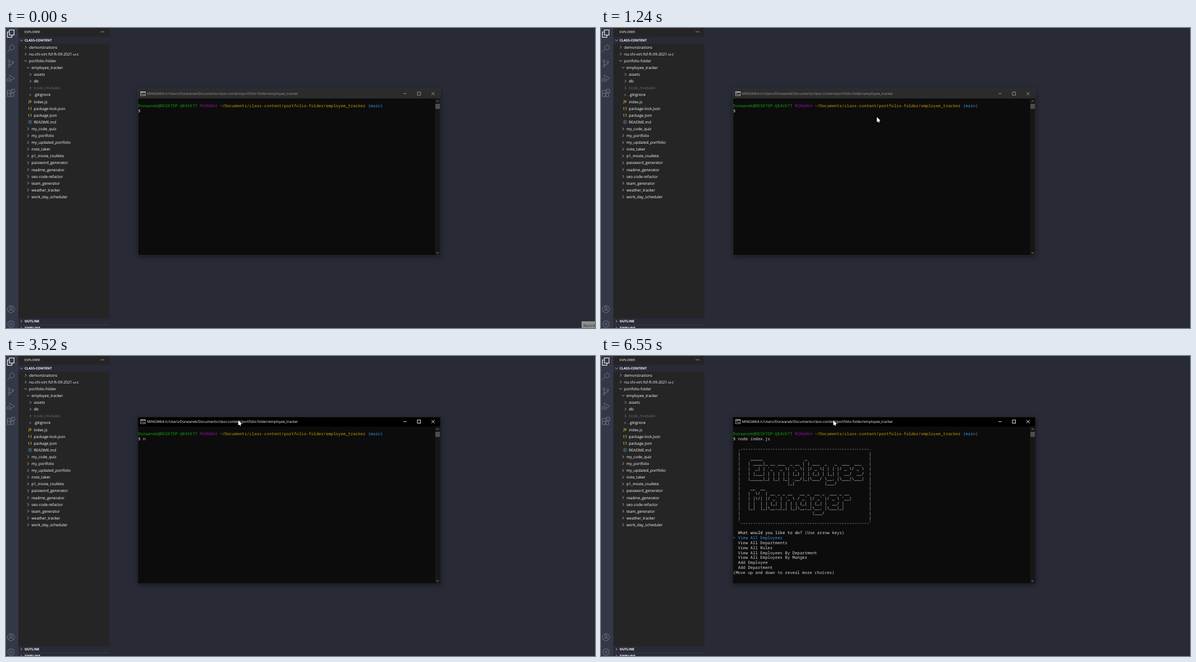
An HTML page with a canvas that plays this animation: 1048x534 px, repeating every 8 s.

```html
<!DOCTYPE html>
<html lang="en">
<head>
<meta charset="utf-8">
<title>Employee manager demo</title>
<style>
html, body { margin: 0; width: 100%; height: 100%; overflow: hidden; background: #282a36; }
canvas { display: block; }
</style>
</head>
<body>
<canvas id="stage" width="1048" height="534"></canvas>
<script>
const ctx = document.getElementById('stage').getContext('2d');
const LOOP = 8000, TAU = Math.PI * 2;
const UI = '"Open Sans", "Noto Sans", sans-serif';
const MONO = '"Noto Sans Mono", "DejaVu Sans Mono", monospace';
const USER = 'Dorwanek', HOST = 'DESKTOP-QK4VX7T';
const CELL = 4.4, LINE = 8.8, ROW = 12.1;
const ICON = '#6d7387', LIGHT = '#c5c5c5', WHITE = '#ffffff';

function rect(x, y, w, h, color) {
  ctx.fillStyle = color;
  ctx.fillRect(x, y, w, h);
}

function box(x, y, w, h, color, width = 1) {
  ctx.strokeStyle = color;
  ctx.lineWidth = width;
  ctx.strokeRect(x, y, w, h);
}

function text(str, x, y, color, size, weight = 500, family = UI) {
  ctx.font = `${weight} ${size}px ${family}`;
  ctx.fillStyle = color;
  ctx.fillText(str, x, y);
}

function path(color, width, ...points) {
  ctx.strokeStyle = color;
  ctx.lineWidth = width;
  ctx.beginPath();
  for (const [x, y] of points) ctx.lineTo(x, y);
  ctx.stroke();
}

function ring(x, y, r, color, width = 1, from = 0, to = TAU) {
  ctx.strokeStyle = color;
  ctx.lineWidth = width;
  ctx.beginPath();
  ctx.arc(x, y, r, from, to);
  ctx.stroke();
}

// An angle mark pointing right, turned by a number of quarter turns.
function chevron(x, y, quarter = 0, color = LIGHT, s = 2.3) {
  ctx.save();
  ctx.translate(x, y);
  ctx.rotate(quarter * TAU / 4);
  path(color, 0.9, [-s / 2, -s], [s / 2, 0], [-s / 2, s]);
  ctx.restore();
}

// Activity bar

function filesIcon(x, y) {
  box(x - 6, y - 3, 8, 9.5, WHITE, 1.1);
  rect(x - 3, y - 7, 9, 10, '#343746');
  box(x - 2.5, y - 6.5, 8.3, 9, WHITE, 1.1);
}

function searchIcon(x, y) {
  ring(x + 2, y - 2, 4.2, ICON);
  path(ICON, 1.1, [x - 1, y + 1], [x - 6, y + 6.5]);
}

function branchIcon(x, y) {
  for (const [dx, dy] of [[-3, -4.5], [-3, 4.7], [3.5, -2]]) ring(x + dx, y + dy, 1.9, ICON);
  path(ICON, 1, [x - 3, y - 2.6], [x - 3, y + 2.8]);
  path(ICON, 1, [x + 3.5, y], [x + 2, y + 2], [x - 3, y + 2]);
}

function debugIcon(x, y) {
  path(ICON, 1, [x - 2.5, y - 2], [x - 2.5, y - 6], [x + 6.5, y], [x + 1, y + 3.8]);
  ring(x - 3, y + 3, 2.7, ICON);
  for (let i = 0; i < 6; i++) {
    const a = (i % 3 - 1) * 0.7 + (i < 3 ? 0 : Math.PI);
    const c = Math.cos(a), s = Math.sin(a);
    path(ICON, 0.8, [x - 3 + 2.7 * c, y + 3 + 2.7 * s], [x - 3 + 4.8 * c, y + 3 + 4.8 * s]);
  }
}

function extensionsIcon(x, y) {
  for (let i = 0; i < 4; i++) {
    const lift = i === 1 ? 1.8 : 0;
    box(x - 6 + (i % 2) * 5.5 + lift, y - 5 + (i >> 1) * 5.5 - lift, 5.5, 5.5, ICON);
  }
}

function accountIcon(x, y) {
  ring(x, y, 6.3, ICON);
  ring(x, y - 2, 2.4, ICON);
  ring(x, y + 5, 4.2, ICON, 1, Math.PI * 1.08, Math.PI * 1.92);
}

function gearIcon(x, y) {
  const teeth = Array.from({ length: 33 }, (_, i) => {
    const a = (i + 0.5) * TAU / 32, r = i % 4 < 2 ? 6.4 : 4.8;
    return [x + r * Math.cos(a), y + r * Math.sin(a)];
  });
  path(ICON, 1, ...teeth);
  ring(x, y, 1.9, ICON);
}

function activityBar() {
  rect(0, 0, 22, 534, '#343746');
  [filesIcon, searchIcon, branchIcon, debugIcon, extensionsIcon]
    .forEach((icon, i) => icon(8.5, 10 + i * 26.5));
  accountIcon(8.8, 500.5);
  gearIcon(8.8, 527);
}

// Explorer: each line is indented by depth and starts with its kind of icon

const TREE = `
> demonstrations
> nu-chi-virt-fsf-ft-09-2021-u-c
v portfolio-folder
 v employee_tracker
  > assets
  > db
  > node_modules
  # .gitignore
  JS index.js
  {} package-lock.json
  {} package.json
  i README.md
 > my_code_quiz
 > my_portfolio
 > my_updated_portfolio
 > note_taker
 > p1_movie_roullete
 > password_generator
 > readme_generator
 > seo-code-refactor
 > team_generator
 > weather_tracker
 > work_day_scheduler`.slice(1).split('\n').map(s => {
  const [kind, label] = s.trim().split(' ');
  return { kind, label, depth: s.search(/\S/) };
});

function treeIcon(kind, x, y, color) {
  if (kind === '>') chevron(x, y, 0, color);
  else if (kind === 'v') chevron(x, y, 1, color);
  else if (kind === '#') rect(x - 2.5, y - 1.7, 3.4, 3.4, '#41535b');
  else if (kind === 'i') {
    ring(x - 0.8, y, 2.8, '#519aba', 0.8);
    path('#519aba', 0.9, [x - 0.8, y - 1.7], [x - 0.8, y + 1.7]);
  } else if (kind === 'JS') text(kind, x - 3.6, y + 2.1, '#e0b43c', 6, 700);
  else text('{ }', x - 4, y + 2.1, '#d8c840', 6, 700);
}

function section(y, label, quarter) {
  chevron(27.5, y, quarter);
  text(label, 33, y + 2.2, WHITE, 6, 700);
}

function explorer() {
  rect(22, 0, 162, 534, '#252526');
  rect(22, 15.5, 162, 12.5, '#282a36');
  rect(22, 516.5, 162, 17.5, '#282a36');
  rect(22, 528, 162, 0.6, '#454753');

  text('EXPLORER', 33, 8.6, WHITE, 5.7);
  for (let i = 0; i < 3; i++) rect(168.6 + i * 2.4, 6.2, 1.2, 1.2, '#d0d0d0');
  section(22, 'CLASS-CONTENT', 1);

  TREE.forEach(({ kind, label, depth }, i) => {
    const x = 41 + depth * 4.3, y = 34.3 + i * ROW;
    const dim = label === 'node_modules';
    treeIcon(kind, x - 6, y, dim ? '#8a8a8a' : LIGHT);
    text(label, x, y + 2.4, dim ? '#6c6c6c' : WHITE, 6.8);
  });

  section(522, 'OUTLINE', 0);
  section(534.2, 'TIMELINE', 0);
}

// Terminal

const BANNER = String.raw`
 _____                 _
| ____|_ __ ___  _ __ | | ___  _   _  ___  ___
|  _| | '_ ' _ \| '_ \| |/ _ \| | | |/ _ \/ _ \
| |___| | | | | | |_) | | (_) | |_| |  __/  __/
|_____|_| |_| |_| .__/|_|\___/ \__, |\___|\___|
                |_|            |___/
 __  __
|  \/  | __ _ _ __   __ _  __ _  ___ _ __
| |\/| |/ _' | '_ \ / _' |/ _' |/ _ \ '__|
| |  | | (_| | | | | (_| | (_| |  __/ |
|_|  |_|\__,_|_| |_|\__,_|\__, |\___|_|
                          |___/
`.replace(/(_) '(?= _ \\\|)|(_)'(?= \|)|(_)'(?= \|\/)/g, m => m.replace("'", '`')).split('\n');
const CHOICES = ['View All Employees', 'View All Departments', 'View All Roles',
  'View All Employees By Department', 'View All Employees By Manger',
  'Add Employee', 'Add Department'];
const CLICK = 2370, OUTPUT = 6550;

function put(str, col, row, color = '#d4d4d4', weight = 400) {
  text(str, 235 + col * CELL, 141.4 + row * LINE, color, CELL / 0.6, weight, MONO);
}

// Keys pressed by time t when a word is typed evenly between two times.
function keys(word, from, to, t) {
  if (t < from) return '';
  return word.slice(0, 1 + Math.floor((t - from) / (to - from) * (word.length - 1) + 1e-6));
}

function command(t) {
  const tail = t < 4890 ? '' : ' ' + keys('ind', 4890, 5220, t);
  return keys('node', 3520, 4090, t) + tail + (t < 5400 ? '' : 'ex.js');
}

function prompt(t) {
  const parts = [
    [`${USER}@${HOST}`, '#13a10e'],
    ['MINGW64', '#881798'],
    ['~/Documents/class-content/portfolio-folder/employee_tracker', '#c19c00'],
    ['(main)', '#3a96dd']
  ];
  let col = 0;
  for (const [str, color] of parts) {
    put(str, col, 0, color);
    col += str.length + 1;
  }
  put('$ ' + command(t), 0, 1);
}

function output() {
  const rule = '-'.repeat(52);
  const frame = [`,${rule}.`, ...BANNER.map(s => '|   ' + s.padEnd(49) + '|'), '`' + rule + "'"];
  frame.forEach((s, i) => put(s, 2, 3 + i, '#d4d4d4', 500));

  put('What would you like to do?', 2, 20, '#f2f2f2', 500);
  put('(Use arrow keys)', 29, 20);
  put('>', 0, 21, '#3a96dd');
  CHOICES.forEach((s, i) => put(s, 2, 21 + i, i ? '#d4d4d4' : '#3a96dd'));
  put('(Move up and down to reveal more choices)', 0, 28);
}

function titleBar(active) {
  const ink = active ? WHITE : '#9a9a9a';
  rect(235, 109, 538, 16.5, active ? '#000000' : '#2b2b2b');

  box(239.5, 113.5, 8.5, 7, '#b8b8b8', 0.8);
  rect(239.5, 113.2, 8.5, 1.5, '#d8d8d8');
  rect(241, 117, 2.5, 1, '#e8e8e8');
  rect(244.5, 118, 2, 1, '#e8e8e8');

  text(`MINGW64:/c/Users/${USER}/Documents/class-content/portfolio-folder/employee_tracker`,
    251, 119.2, ink, 6.35);

  const y = 116.8, s = 2.8;
  path(ink, 0.9, [710 - s, y], [710 + s, y]);
  box(734.8 - s, y - s, 2 * s, 2 * s, ink, 0.9);
  for (const k of [-s, s]) path(ink, 0.9, [760 - s, y - k], [760 + s, y + k]);
}

function terminal(t) {
  const active = t >= CLICK;
  ctx.save();
  ctx.shadowColor = 'rgba(0,0,0,.45)';
  ctx.shadowBlur = 9;
  ctx.shadowOffsetY = 2;
  rect(235, 109, 538, 296, '#0c0c0c');
  ctx.restore();

  titleBar(active);
  rect(763.5, 125.5, 9, 279, '#171717');
  rect(764, 135, 8, 9, '#4d4d4d');
  chevron(768, 130.3, 3, '#b0b0b0', 2);
  chevron(768, 400.3, 1, '#b0b0b0', 2);
  box(234.8, 108.8, 538, 296, active ? '#24252b' : '#3b3c42', 0.6);

  ctx.save();
  ctx.beginPath();
  ctx.rect(235, 125.5, 528, 279);
  ctx.clip();
  prompt(t);
  if (t >= OUTPUT) output();
  ctx.restore();
}

// Pointer

const START = [1046, 531], REST = [568.3, 202.5], TITLE = [413.3, 114.5];
const ease = p => p * p * (3 - 2 * p);

// Moves in even time steps; the first step falls on the begin time.
function glide(a, b, t, begin, end, steps) {
  const n = Math.floor((t - begin) / (end - begin) * (steps - 1) + 1e-6);
  const p = ease(Math.min(1, (n + 1) / steps));
  return a.map((v, i) => v + (b[i] - v) * p);
}

function pointerAt(t) {
  return t < 860 ? glide(START, REST, t, 50, 760, 14) : glide(REST, TITLE, t, 860, 1640, 16);
}

function pointer(t) {
  if (t >= CLICK && t < CLICK + 90) {
    ctx.fillStyle = 'rgba(200,165,10,.87)';
    ctx.beginPath();
    ctx.arc(413, 114.8, 6.8, 0, TAU);
    ctx.fill();
  }
  ctx.save();
  ctx.translate(...pointerAt(t));
  path(WHITE, 1.5, [2, 5], [4.2, 9.6]);
  ctx.beginPath();
  ctx.lineTo(0, 0);
  ctx.lineTo(0, 8.8);
  ctx.lineTo(6.3, 6.3);
  ctx.closePath();
  ctx.fillStyle = WHITE;
  ctx.fill();
  ctx.restore();
}

function recordButton() {
  rect(1024, 522, 24, 12, '#8e8e8e');
  text('Record', 1027.5, 532.3, '#262626', 6.4);
}

function draw(t) {
  rect(0, 0, 1048, 534, '#282a36');
  activityBar();
  explorer();
  terminal(t);
  if (t < 50) recordButton();
  else pointer(t);
}

ctx.textRendering = 'geometricPrecision';
const began = performance.now();
function tick() {
  draw((performance.now() - began) % LOOP);
  requestAnimationFrame(tick);
}
tick();
</script>
</body>
</html>
```
